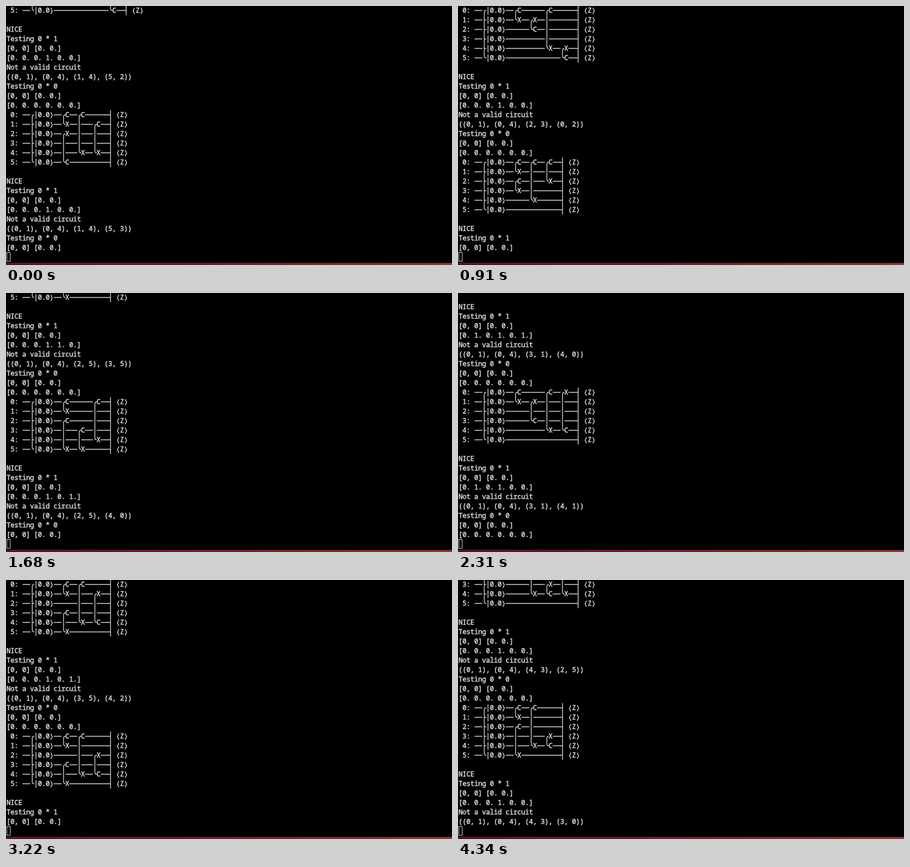
Write an HTML page that moves like this. It is 798 by 464 pixels and loops after 4410 ms.

```html
<!DOCTYPE html>
<html lang="en">
<head>
<meta charset="utf-8">
<title>Circuit search</title>
<style>
  html, body { margin: 0; width: 100%; height: 100%; overflow: hidden; background: #000; }
  #stage { position: relative; width: 798px; height: 464px; overflow: hidden; background: #000; }
  #text {
    position: absolute; left: 1px; top: -1px; margin: 0; color: #dadada;
    font: 12px/17px "Noto Sans Mono", "DejaVu Sans Mono", monospace;
    letter-spacing: calc(7px - 1ch); -webkit-text-stroke: 0.5px #dadada;
    font-variant-ligatures: none; white-space: pre;
  }
  #wires { position: absolute; left: 0; top: 0; fill: none; stroke: #cfcfcf; stroke-width: 1.4; }
  #cursor {
    position: absolute; left: 1px; top: 441px; width: 7px; height: 17px;
    box-sizing: border-box; border: 1px solid #c8c8c8;
  }
  #edge {
    position: absolute; left: 0; right: 0; top: 460px; height: 4px; box-sizing: border-box;
    border-top: 1px solid #3a3a3a;
    background: linear-gradient(90deg, #58101f, #7c1624 45%, #9c3032);
  }
</style>
</head>
<body>
<div id="stage">
  <pre id="text"></pre>
  <svg id="wires" width="798" height="464"><path id="path" transform="translate(1.5 -0.5)"/></svg>
  <div id="cursor"></div>
  <div id="edge"></div>
</div>
<script>
const STEP = 70, STEPS = 63, ROWS = 26, CELL = 7, LINE = 17, QUBITS = 6, BLOCK = 16;

// [step, number of lines printed so far]
const PROGRESS = [[0, 2995], [13, 4334], [24, 5459], [33, 6340], [46, 7662], [52, 8270], [62, 9281]];
// Lines of a block after which the program pauses to compute
const PAUSES = [1, 3, 4, 14, 17];

const same = (a, b) => a[0] === b[0] && a[1] === b[1];
const without = (list, gate) => list.filter(g => !same(g, gate));
const span = gate => [Math.min(...gate), Math.max(...gate)];

const allGates = [];
for (let a = 0; a < QUBITS; a++)
  for (let b = 0; b < QUBITS; b++) if (a !== b) allGates.push([a, b]);

const FIXED = [[0, 1], [0, 4]];
const freeGates = FIXED.reduce(without, allGates);

function circuit(k) {
  const per = freeGates.length - 1;
  const third = freeGates[Math.floor(k / per) % freeGates.length];
  return [...FIXED, third, without(freeGates, third)[k % per]];
}

// Greedy layers; a gate that overlaps one further down moves to a new layer
function layersOf(gates) {
  const depth = Array(QUBITS).fill(0), layers = [];
  for (const g of gates) {
    const d = Math.max(depth[g[0]], depth[g[1]]);
    depth[g[0]] = depth[g[1]] = d + 1;
    (layers[d] = layers[d] || []).push(g);
  }
  for (let i = 0; i < layers.length; i++) {
    const ops = layers[i].sort((a, b) => span(a)[0] - span(b)[0]);
    const moved = ops.filter((g, j) =>
      ops.slice(j + 1).some(o => span(o)[0] <= span(g)[1] && span(g)[0] <= span(o)[1]));
    if (moved.length) {
      layers[i] = ops.filter(g => !moved.includes(g));
      layers.splice(i + 1, 0, moved);
    }
  }
  return layers;
}

function symbol(layer, wire) {
  for (const g of layer) {
    const [top, bottom] = span(g);
    if (wire < top || wire > bottom) continue;
    if (!g.includes(wire)) return "│─";
    return (wire === top ? "╭" : "╰") + (wire === g[0] ? "C" : "X");
  }
  return "──";
}

function wireLine(gates, wire) {
  const start = wire === 0 ? "╭" : wire === QUBITS - 1 ? "╰" : "├";
  const body = layersOf(gates).map(layer => "──" + symbol(layer, wire)).join("");
  return ` ${wire}: ──${start}|0.0⟩${body}──┤ ⟨Z⟩`;
}

function result(gates, bits) {
  for (const [c, x] of gates) bits[x] ^= bits[c];
  return "[" + bits.map(b => b + ".").join(" ") + "]";
}

function lineAt(n) {
  const gates = circuit(Math.floor(n / BLOCK)), row = n % BLOCK;
  if (row >= 4 && row < 10) return wireLine(gates, row - 4);
  switch (row) {
    case 0: return "(" + gates.map(g => `(${g.join(", ")})`).join(", ") + ")";
    case 1: return "Testing 0 * 0";
    case 3: return result(gates, [0, 0, 0, 0, 0, 0]);
    case 10: return "";
    case 11: return "NICE";
    case 12: return "Testing 0 * 1";
    case 14: return result(gates, [0, 0, 0, 1, 0, 0]);
    case 15: return "Not a valid circuit";
    default: return "[0, 0] [0. 0.]";
  }
}

// Box characters as strokes, starting at the top left of the cell
const m = CELL / 2, h = LINE / 2;
const BOX = {
  "─": `m0 ${h}h${CELL}`,
  "│": `m${m} 0v${LINE}`,
  "├": `m${m} 0v${LINE}m0 ${-h}h${m}`,
  "┤": `m${m} 0v${LINE}m0 ${-h}h${-m}`,
  "╭": `m${m} ${LINE}v${m - h}q0 ${-m} ${m} ${-m}`,
  "╰": `m${m} 0v${h - m}q0 ${m} ${m} ${m}`
};

function linesPrinted(step) {
  let i = 1;
  while (step > PROGRESS[i][0]) i++;
  const [s0, n0] = PROGRESS[i - 1], [s1, n1] = PROGRESS[i];
  const n = n0 + (n1 - n0) * (step - s0) / (s1 - s0);
  const base = Math.floor(n / BLOCK) * BLOCK;
  const near = p => Math.abs(base + p - n);
  return base + PAUSES.reduce((a, b) => near(b) < near(a) ? b : a);
}

const text = document.getElementById("text");
const path = document.getElementById("path");

function draw(step) {
  const first = linesPrinted(step) - ROWS;
  const lines = Array.from({ length: ROWS }, (_, i) => lineAt(first + i));
  let d = "";
  lines.forEach((line, row) => [...line].forEach((ch, col) => {
    if (BOX[ch]) d += `M${col * CELL} ${row * LINE}${BOX[ch]}`;
  }));
  text.textContent = lines.join("\n").replace(/[─│├┤╭╰]/g, " ");
  path.setAttribute("d", d);
}

const began = performance.now();
let shown = -1;
function tick() {
  const step = Math.floor((performance.now() - began) / STEP) % STEPS;
  if (step !== shown) draw(shown = step);
  requestAnimationFrame(tick);
}
tick();
</script>
</body>
</html>
```
